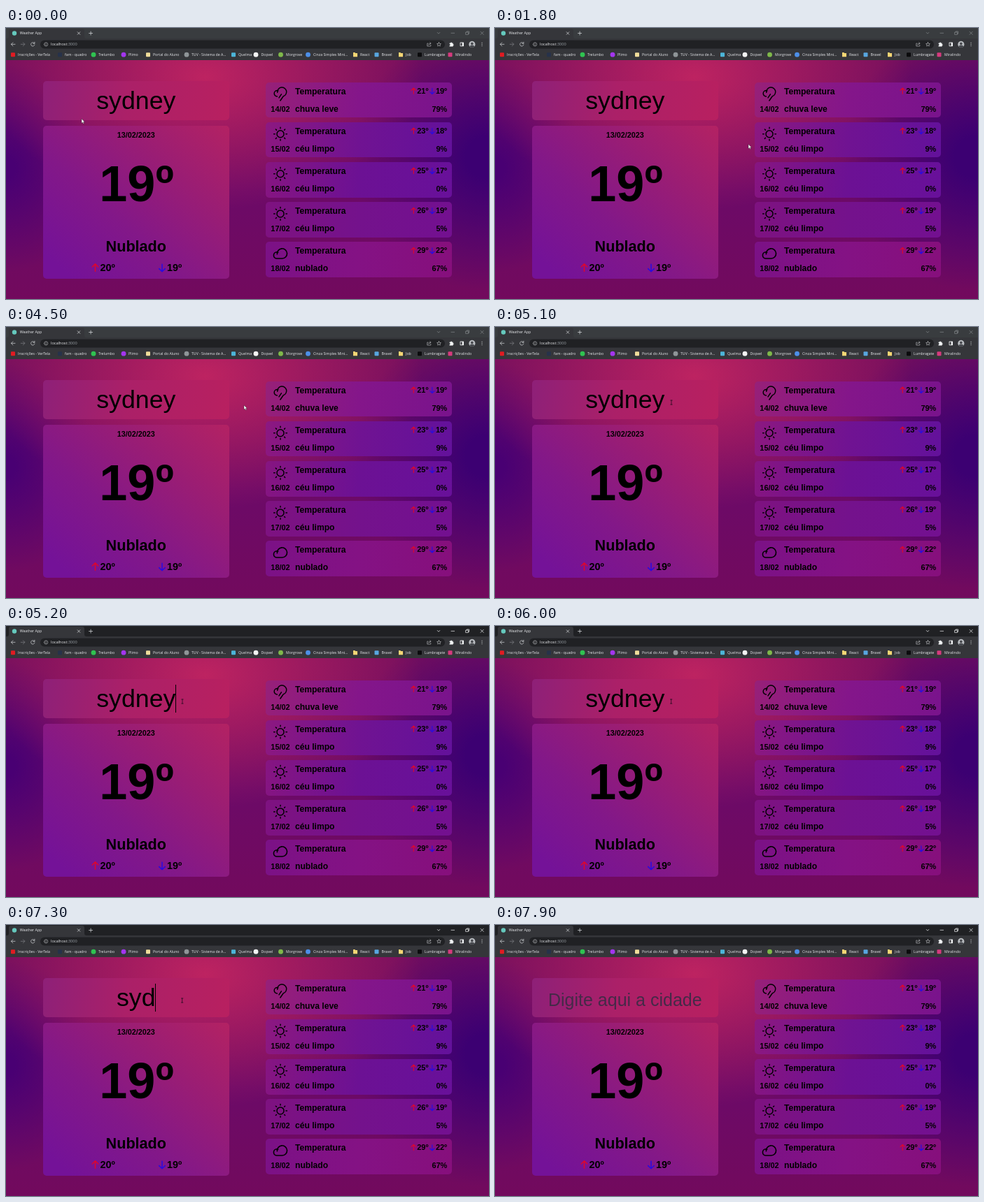
These frames come from a looping animation (690 by 388 pixels, 8 s). An HTML page:

```html
<!DOCTYPE html>
<html lang="pt">
<head>
<meta charset="utf-8">
<title>Weather App</title>
<style>
html, body { margin: 0; width: 100%; height: 100%; overflow: hidden; }
#stage {
  position: relative; width: 690px; height: 388px; overflow: hidden;
  background:
    radial-gradient(310px 190px at 285px 70px, #bd2361, #bd236100),
    radial-gradient(190px 190px at 685px 185px, #3c0072 15%, #3c007200),
    radial-gradient(130px 150px at 0 200px, #490073 10%, #49007300),
    linear-gradient(#760f5d 46px, #6c0a68 60%, #720a5d);
}
.card { position: absolute; border-radius: 5px; }
svg { position: absolute; left: 0; top: 0; }
.page text { font-family: "Liberation Sans", Arial, sans-serif; }
.b { font-weight: 700; }
.ui text { font-family: "Open Sans", "Noto Sans", sans-serif; font-size: 5.2px; fill: #e8eaed; }
.line { fill: none; stroke-linecap: round; stroke-linejoin: round; }
</style>
</head>
<body>
<div id="stage"></div>
<script>
const LOOP = 8000;
const stage = document.getElementById('stage');

const text = (x, y, size, str, anchor = 'start', cls = 'b') =>
  `<text x="${x}" y="${y}" font-size="${size}" text-anchor="${anchor}" class="${cls}">${str}</text>`;
const line = (d, color = '#000', width = 1.6) =>
  `<path class="line" d="${d}" stroke="${color}" stroke-width="${width}"/>`;
const rect = (x, y, w, h, fill, r = 0) =>
  `<rect x="${x}" y="${y}" width="${w}" height="${h}" rx="${r}" fill="${fill}"/>`;
const dot = (x, y, r, fill) => `<circle cx="${x}" cy="${y}" r="${r}" fill="${fill}"/>`;
const label = (x, y, str) => `<text x="${x}" y="${y}">${str}</text>`;
const card = (x, y, w, h, fill) =>
  `<div class="card" style="left:${x}px;top:${y}px;width:${w}px;height:${h}px;background:linear-gradient(${fill})"></div>`;

// Weather icons, centred on x, y
const cloud = (x, y) => line(`M${x - 4.6} ${y + .8}A7.1 7.1 0 1 1 ${x + 2.6} ${y + 7}H${x - 5}a4.6 4.6 0 0 1 0 -9.2q.9 0 1.6 .3`);
const icons = {
  cloud,
  rain: (x, y) => `<g transform="translate(${x} ${y - 3}) scale(.92)">${
    line('M-4.6 .8A7.1 7.1 0 1 1 4.5 6.7M-5 7a4.6 4.6 0 0 1 0-9.2q.9 0 1.6 .3M1.5 3.5L-2.2 9M4 7.5L-.2 13.5')}</g>`,
  sun: (x, y) => {
    let d = `M${x - 5} ${y}a5 5 0 1 1 10 0a5 5 0 1 1 -10 0`;
    for (let i = 0; i < 8; i++) {
      const c = Math.cos(i * Math.PI / 4), s = Math.sin(i * Math.PI / 4);
      d += `M${x + 7.9 * c} ${y + 7.9 * s}L${x + 9.4 * c} ${y + 9.4 * s}`;
    }
    return line(d, '#000', 1.5);
  }
};
const arrow = (x, y, dir, k) => {
  const tip = y - dir * 5 * k, wing = y - dir * 1.2 * k;
  return line(`M${x} ${y + dir * 4.6 * k}V${tip}M${x - 3.9 * k} ${wing}L${x} ${tip}L${x + 3.9 * k} ${wing}`,
    dir > 0 ? '#e0062c' : '#2a0be0', 1.4 * k);
};

const days = [
  ['rain', '14/02', 'chuva leve', 21, 19, 79, '100deg,#972078,#84168a 50%,#79138c'],
  ['sun', '15/02', 'céu limpo', 23, 18, 9, '95deg,#8c1880,#701392 50%,#63119b'],
  ['sun', '16/02', 'céu limpo', 25, 17, 0, '95deg,#861581,#6c1194 50%,#68109a'],
  ['sun', '17/02', 'céu limpo', 26, 19, 5, '95deg,#7e1280,#74128c 50%,#731090'],
  ['cloud', '18/02', 'nublado', 29, 22, 67, '95deg,#7b1186,#841284 50%,#860f7c']
];

function dayText([icon, date, sky, max, min, rain], i) {
  const y = 57.1 * i;
  return icons[icon](392, 94.6 + y) +
    text(392, 120 + y, 10.9, date, 'middle') +
    text(413, 94.5 + y, 12.1, 'Temperatura') +
    text(413, 119.6 + y, 12.1, sky) +
    arrow(582.3, 90.3 + y, 1, .85) + text(587.3, 94 + y, 10.9, max + 'º') +
    arrow(608.8, 90.3 + y, -1, .85) + text(630, 94 + y, 10.9, min + 'º', 'end') +
    text(630.3, 119.6 + y, 10.9, rain + '%', 'end');
}

// Bookmarks: icon x, colour, round icon?, text x, text
const marks = [
  [10, '#e01b22', 0, 17, 'Inscrições - VerTela'],
  [77, '#27324a', 0, 84, 'fam - quadro'],
  [125, '#2fc351', 1, 132, 'Trelumbo'],
  [168, '#a435f0', 1, 175, 'Plimo'],
  [203, '#f0dc9a', 0, 210, 'Portal do Aluno'],
  [258, '#8f9598', 1, 265, 'TUV - Sistema de A...'],
  [325, '#4cb5d8', 0, 332, 'Quelma'],
  [357, '#f4f4f4', 1, 364.5, 'Dopvel'],
  [392.5, '#7fb84a', 1, 400, 'Morgrove'],
  [431.5, '#4d8fe8', 1, 439, 'Cinza Simples Mini...'],
  [499, 'folder', 0, 506, 'React'],
  [529.5, '#58a6e0', 0, 536.5, 'Bravel'],
  [564, 'folder', 0, 571, 'Job'],
  [591, '#0b0b0d', 0, 598, 'Lumbragate'],
  [634.5, '#d63a7e', 0, 642, 'Miralindo']
];
const folder = x => `<path d="M${x - 3} 35h2.4l.8 .9h2.8v5.3h-6z" fill="#f6d674"/>`;
const mark = ([x, fill, round, tx, str]) =>
  (fill === 'folder' ? folder(x) : round ? dot(x, 38.2, 3.4, fill) : rect(x - 3, 35.2, 6, 6, fill, 1)) +
  label(tx, 40, str);

const gray = '#c4c7ca';
const browser = `
  <g class="ui">
    <rect id="strip" width="690" height="16"/>
    <path d="M1 15q3 0 3-3V4q0-3 3-3H109q3 0 3 3v8q0 3 3 3z" fill="#35363a"/>
    ${rect(0, 15, 690, 31, '#35363a')}
    ${dot(12, 7.5, 3.2, '#65c9bd')}
    ${label(19.7, 9.4, 'Weather App')}
    ${line('M102.2 5.7l3.6 3.6m0-3.6l-3.6 3.6', '#dfe1e4', .7)}
    ${line('M118.6 7.5h5M121.1 5v5', '#dfe1e4', .7)}
    <g id="buttons" class="line" stroke-width=".7">
      <path d="M616.2 6.4l1.8 1.8 1.8-1.8M636 7.3h4.6M657 6h3.4v3.4h-3.4zM658.2 6v-1.1h3.4v3.4h-1.2M678 5.2l4.2 4.2m0-4.2l-4.2 4.2"/>
    </g>
    ${line('M13 23.3H7.4l2.5-2.5M7.4 23.3l2.5 2.5', gray, .8)}
    ${line('M21.3 23.3h5.6l-2.5-2.5M26.9 23.3l-2.5 2.5', '#77797d', .8)}
    ${line('M40.6 21.9a2.7 2.7 0 1 0 .3 2.2M40.9 20.2v2.1h-2.1', gray, .8)}
    ${rect(49, 17.5, 578, 12, '#202124', 6)}
    ${line('M54.5 23.4a2.6 2.6 0 1 1 5.2 0a2.6 2.6 0 1 1 -5.2 0M57.1 23.3v1.3M57.1 22v.1', gray, .6)}
    <text x="64" y="25.4" style="font-size:5.6px">localhost<tspan fill="#9aa0a6">:3000</tspan></text>
    ${line('M603 22h-1.2v4h5v-1.5M603.3 24.2q.4-2.2 3.6-2.2m-1.3-1.4l1.4 1.4-1.4 1.4', gray, .6)}
    ${line('M618.5 20.5l.9 1.9 2 .2-1.5 1.4.4 2-1.8-1-1.8 1 .4-2-1.5-1.4 2-.2z', gray, .6)}
    <path d="M633.6 21.6h1.5a1 1 0 0 1 2 0h1.5v1.6a1 1 0 0 1 0 2v1.3h-5v-1.4a1 1 0 0 0 0-2z" fill="#f1f3f4"/>
    ${rect(648.6, 20.6, 5.4, 5.6, '#f1f3f4', .6)}${rect(649.4, 21.4, 2.2, 4, '#35363a')}
    ${dot(665.8, 23.4, 4.6, '#b9bcc0')}
    <path d="M662.3 26.4q.6-2 3.5-2t3.5 2a4.6 4.6 0 0 1-7 0z" fill="#45474c"/>${dot(665.8, 22.4, 1.8, '#45474c')}
    ${[21.2, 23.4, 25.6].map(y => dot(680, y, .6, gray)).join('')}
    ${marks.map(mark).join('')}
  </g>`;

stage.innerHTML =
  card(53, 76, 266, 55.5, '95deg,#8e2078,#ab2068 45%,#b82060') +
  card(53, 140, 266, 219, '42deg,#741298 8%,#831888 40%,#9a1d74 70%,#b32263') +
  days.map((d, i) => card(371, 78 + 57.1 * i, 266, 50.4, d[6])).join('') +
  `<svg width="690" height="388" viewBox="0 0 690 388">
    <g class="page">
      <text id="city" x="185.8" y="116.2" text-anchor="middle"></text>
      <rect id="caret" y="84" width="1" height="40"/>
      ${text(185.8, 157, 10.8, '13/02/2023', 'middle')}
      ${text(186.5, 248.4, 72, '19º', 'middle')}
      ${text(185.8, 319.8, 21.6, 'Nublado', 'middle')}
      ${arrow(127.5, 343.3, 1, 1.1)}${text(134.5, 348.3, 14.4, '20º')}
      ${arrow(223, 343.3, -1, 1.1)}${text(230, 348.3, 14.4, '19º')}
      ${days.map(dayText).join('')}
    </g>
    ${browser}
    <path id="arrow" d="M0 0V6.2L1.5 4.9L2.5 7.1L3.5 6.6L2.5 4.5H4.4Z" fill="#fff" stroke="#222" stroke-width=".4"/>
    <path id="beam" class="line" d="M-1.2 -3H1.2M0 -3V3M-1.2 3H1.2" stroke="#160a18" stroke-width=".7"/>
  </svg>`;

// Each table holds [start ms, value...]; the last row already started applies
const pointer = [
  [0, 108, 130], [100, 155, 148], [200, 255, 178], [300, 335, 192], [400, 361, 187],
  [1800, 362, 166.5], [3600, 364.5, 167.5], [3700, 366, 148], [3800, 364, 126], [3900, 362, 113],
  [4400, 356, 113], [4500, 340, 112], [4600, 318, 111], [4700, 295, 110],
  [4800, 275, 109], [4900, 260, 108.5], [5000, 253, 108], [5100, 252, 108], [5300, 251.7, 108]
];
const typed = [
  [0, 'sydney'], [7100, 'sydne'], [7200, 'sydn'], [7300, 'syd'], [7600, 'sy'], [7700, 's'], [7800, '']
];
const caretOn = [[0, 0], [5200, 1], [5700, 0], [6300, 1], [6800, 0], [7100, 1], [7800, 0]];
const at = (table, t) => table.findLast(row => row[0] <= t);

const el = id => document.getElementById(id);
const [city, caret, strip, buttons, mouse, beam] =
  ['city', 'caret', 'strip', 'buttons', 'arrow', 'beam'].map(el);
const em = { s: .5, y: .5, d: .556, n: .556, e: .556 };
const SIZE = 35.7;

function draw(now) {
  const t = now % LOOP;
  const word = at(typed, t)[1];
  city.textContent = word || 'Digite aqui a cidade';
  city.setAttribute('font-size', word ? SIZE : 25);
  city.setAttribute('fill', word ? '#000' : '#452a48');

  const width = [...word].reduce((sum, c) => sum + em[c] * SIZE, 0);
  caret.setAttribute('x', Math.floor(185.8 + width / 2));
  caret.style.opacity = at(caretOn, t)[1];

  const focused = t >= 5200;
  strip.setAttribute('fill', focused ? '#202124' : '#393c3f');
  buttons.setAttribute('stroke', focused ? '#f1f3f4' : '#85888c');

  const [, x, y] = at(pointer, t);
  const overInput = x > 53 && x < 319 && y > 76 && y < 131 && t > 1000;
  mouse.style.opacity = overInput ? 0 : 1;
  beam.style.opacity = overInput && t < 7800 ? 1 : 0;
  for (const p of [mouse, beam]) p.setAttribute('transform', `translate(${x} ${y})`);
  requestAnimationFrame(() => draw(performance.now()));
}
draw(performance.now());
</script>
</body>
</html>
```
